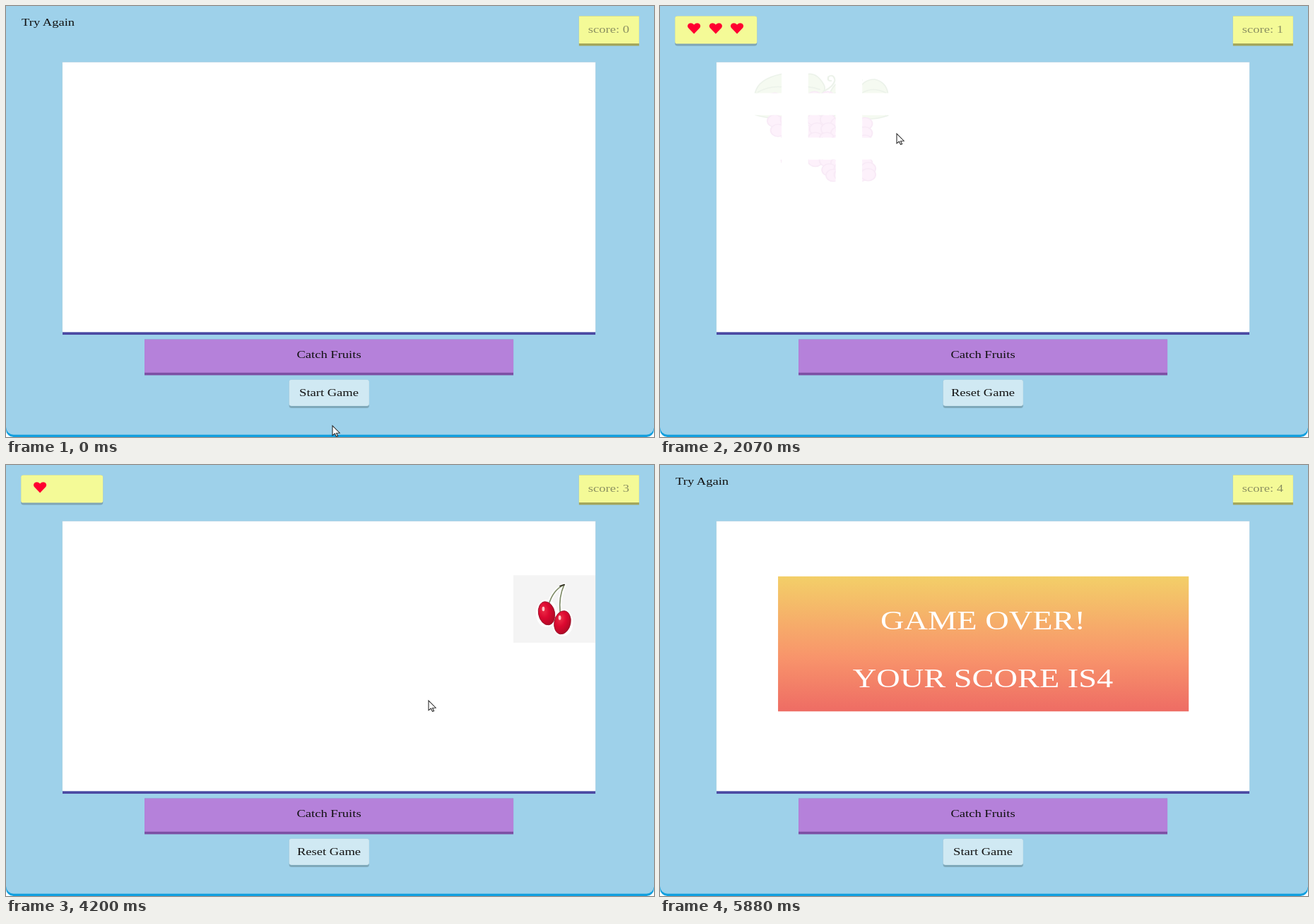
These frames come from a looping animation (917x611 px, 5910 ms). An HTML page:

```html
<!DOCTYPE html>
<html lang="en">
<head>
<meta charset="utf-8">
<title>Catch Fruits</title>
<style>
  html, body { margin: 0; width: 100%; height: 100%; overflow: hidden; background: #fff; }
  #stage { display: block; width: 917px; height: 611px; }
  text { font: 16px "Liberation Serif", "Times New Roman", serif; fill: #111; }
  .mid { text-anchor: middle; }
  #score { fill: #8b9062; }
  #over text { font-size: 40px; fill: #fff; }
</style>
</head>
<body>
<!-- The page is laid out at 790.5 x 638.5 and the whole of it is fitted to the stage. -->
<svg id="stage" viewBox="0 0 790.5 638.5" preserveAspectRatio="none">
  <defs>
    <linearGradient id="sunset" x1="0" y1="0" x2="0" y2="1">
      <stop offset="0" stop-color="#f3cf68"/>
      <stop offset=".6" stop-color="#f8946b"/>
      <stop offset="1" stop-color="#ee6c64"/>
    </linearGradient>
    <radialGradient id="red" cx=".35" cy=".35" r=".75">
      <stop offset="0" stop-color="#ec3048"/>
      <stop offset=".45" stop-color="#dc0830"/>
      <stop offset="1" stop-color="#a80a24"/>
    </radialGradient>
    <clipPath id="field"><rect width="650" height="400"/></clipPath>
    <path id="heart" fill="#ff0030" d="M0 8.3L-7-.6C-10-5.5-4-11 0-5.2C4-11 10-5.5 7-.6Z"/>

    <g id="cherries">
      <rect width="100" height="100" fill="#f4f4f4"/>
      <g fill="#fff" stroke="#fff" stroke-width="6">
        <ellipse cx="40.5" cy="56.4" rx="10" ry="17.4"/>
        <ellipse cx="59.8" cy="70" rx="10" ry="17.4"/>
      </g>
      <g fill="none" stroke-linecap="round">
        <path d="M62 14Q48 22 43 44M62 14Q55 32 57 55" stroke="#fff" stroke-width="5"/>
        <path d="M62 14Q48 22 43 44M62 14Q55 32 57 55" stroke="#7f8c68" stroke-width="1.5"/>
        <path d="M57 16L62 14" stroke="#3c3a2c" stroke-width="2"/>
      </g>
      <g fill="url(#red)" stroke="#94132a" stroke-width=".8">
        <ellipse cx="40.5" cy="56.4" rx="10" ry="17.4" transform="rotate(-8 40.5 56.4)"/>
        <ellipse cx="59.8" cy="70" rx="10" ry="17.4" transform="rotate(8 59.8 70)"/>
      </g>
      <g fill="#ffc4c8">
        <ellipse cx="36.5" cy="50" rx="1.6" ry="3.4"/>
        <ellipse cx="56.5" cy="63" rx="1.6" ry="3.4"/>
      </g>
    </g>

    <g id="grapes">
      <g fill="#a9d27c" stroke="#4b8d3c" stroke-width="1.6">
        <path d="M1 33Q5 12 33 5Q44 3 52 20Q58 33 40 38Q20 40 1 33Z"/>
        <path d="M58 38Q66 12 82 13Q96 17 98 34Q80 42 58 38Z"/>
        <path d="M4 32Q24 18 48 28M64 35Q78 22 96 33" fill="none"/>
        <path d="M53 30Q64 24 66 14Q64 4 58 9Q56 16 62 15" fill="none" stroke-width="2"/>
      </g>
      <g id="bunch" fill="#ee7fe2" stroke="#bd38b2" stroke-width="1.6"></g>
    </g>
  </defs>

  <rect width="790.5" height="638.5" fill="#fff"/>
  <rect y="-30" width="790.5" height="668.5" rx="9" ry="11" fill="#129fde"/>
  <rect y="-30" width="790.5" height="665" rx="9" ry="11" fill="#9ed1ea"/>

  <text id="again" x="19" y="29.5">Try Again</text>
  <g id="lives">
    <rect x="18.3" y="15" width="100" height="44" rx="3" fill="#7fa5b6"/>
    <rect x="18.3" y="15" width="100" height="41" rx="3" fill="#f4fa97"/>
    <use href="#heart" x="41.5" y="33"/>
    <use href="#heart" x="68" y="33"/>
    <use href="#heart" x="94" y="33"/>
  </g>

  <rect x="699" y="15" width="73.3" height="44" fill="#a3a55a"/>
  <rect x="699" y="15" width="73.3" height="40.5" fill="#f4fa97"/>
  <text id="score" x="710.2" y="40.2"></text>

  <rect x="68.5" y="82.8" width="651" height="400" fill="#b9d6e4"/>
  <rect x="69" y="483" width="650" height="4" fill="#4b49a2"/>
  <g transform="translate(69 83.3)" clip-path="url(#field)">
    <rect width="650" height="400" fill="#fff"/>
    <use id="fruit"/>
    <g id="pieces"></g>
    <g id="over">
      <rect x="75" y="81.7" width="501" height="200" fill="url(#sunset)"/>
      <text class="mid" x="325" y="160">GAME OVER!</text>
      <text class="mid" x="325" y="246.3">YOUR SCORE IS4</text>
    </g>
  </g>

  <rect x="169" y="494" width="450" height="53" fill="#7c50a4"/>
  <rect x="169" y="494" width="450" height="49.2" fill="#b581da"/>
  <text class="mid" x="394" y="521.7">Catch Fruits</text>

  <rect x="345.4" y="553.6" width="97.6" height="42" rx="3" fill="#7fa9ba"/>
  <rect x="345.4" y="553.6" width="97.6" height="38.8" rx="3" fill="#d0e9f3"/>
  <text class="mid" id="button" x="394" y="577.8"></text>

  <path id="cursor" d="M0 0V14.4L2.9 11.6L4.7 16.2L6.6 15.4L4.8 10.8H8.8Z" fill="#fff" stroke="#222" stroke-width=".9"/>
</svg>

<script>
const LOOP = 5910, FRAME = 30, START = 1560, END = 5040, BURST = 150;
const SX = 917 / 790.5, SY = 611 / 638.5;
const $ = id => document.getElementById(id);
const NS = 'http://www.w3.org/2000/svg';

function add(parent, tag, attrs) {
  const el = document.createElementNS(NS, tag);
  set(el, attrs);
  return parent.appendChild(el);
}
function set(el, attrs) {
  for (const k in attrs) el.setAttribute(k, attrs[k]);
}
const show = (el, on) => { el.style.display = on ? '' : 'none'; };
const mix = (a, b, p) => a + (b - a) * p;
const swing = p => 0.5 - Math.cos(Math.PI * p) / 2;

// kind, left, first and last moment, last top, caught
const falls = [
  ['grapes', 78.5, 1560, 1935, 45, true],
  ['cherries', 310, 2100, 2430, 130, true],
  ['grapes', 180, 2580, 2970, 400, false],
  ['cherries', 420, 2970, 3210, 230, true],
  ['grapes', 300, 3420, 3990, 400, false],
  ['cherries', 550, 3990, 4410, 210, true],
  ['grapes', 240, 4560, END, 400, false]
];

// time, x, y of the pointer in stage pixels
const path = [
  [0, 462, 595], [120, 466, 622], [1200, 470, 622], [1380, 459, 547],
  [1590, 458, 546], [1920, 258, 190], [2070, 335, 181], [2430, 470, 250],
  [2700, 540, 300], [3210, 620, 336], [3390, 622, 335], [3900, 600, 334],
  [4200, 598, 334], [4410, 724, 331], [4590, 735, 332], [5010, 655, 333],
  [5400, 651, 333], [5640, 640, 622], [LOOP, 640, 622]
];

const bunch = [[25, 42], [41, 40], [57, 40], [70, 46], [29, 56], [44, 54], [58, 54],
  [70, 60], [42, 68], [56, 68], [70, 72], [59, 82], [74, 80], [64, 90], [74, 89]];
for (const [cx, cy] of bunch) add($('bunch'), 'circle', { cx, cy, r: 9 });

const CELL = 100 / 3;
const pieces = [];
for (let i = 0; i < 9; i++) {
  const col = i % 3, row = Math.floor(i / 3);
  const box = add($('pieces'), 'svg', {
    width: CELL, height: CELL,
    viewBox: `${col * CELL} ${row * CELL} ${CELL} ${CELL}`
  });
  pieces.push({ box, col, row, image: add(box, 'use', {}) });
}

function drawFruit(t) {
  const fall = falls.find(f => t >= f[2] && t < f[3]);
  show($('fruit'), fall);
  if (fall) {
    const [kind, x, from, to, top] = fall;
    set($('fruit'), { href: '#' + kind, x, y: mix(-50, top, (t - from) / (to - from)) });
  }

  const hit = falls.find(f => f[5] && t >= f[3] && t < f[3] + BURST);
  show($('pieces'), hit);
  if (!hit) return;
  const [kind, x, , at, y] = hit;
  const p = (t - at) / BURST, spread = swing(p);
  set($('pieces'), { opacity: 1 - p });
  for (const { box, col, row, image } of pieces) {
    set(image, { href: '#' + kind });
    set(box, {
      x: x + CELL * (col + (col - 1) * spread),
      y: y + CELL * (row + (row - 1) * spread)
    });
  }
}

function drawCursor(t) {
  const i = path.findIndex(k => k[0] > t);
  const [t0, x0, y0] = path[i - 1], [t1, x1, y1] = path[i];
  const p = swing((t - t0) / (t1 - t0));
  set($('cursor'), { transform: `translate(${mix(x0, x1, p) / SX} ${mix(y0, y1, p) / SY})` });
}

function draw(t) {
  const playing = t >= START && t < END;
  const count = caught => falls.filter(f => f[5] === caught && t >= f[3]).length;
  show($('again'), !playing);
  show($('lives'), playing);
  show($('over'), t >= END);
  $('lives').querySelectorAll('use').forEach((h, i) => show(h, i < 3 - count(false)));
  $('score').textContent = 'score: ' + count(true);
  $('button').textContent = playing ? 'Reset Game' : 'Start Game';
  drawFruit(t);
  drawCursor(t);
}

function tick() {
  const t = performance.now() % LOOP;
  draw(Math.floor(t / FRAME) * FRAME);
  requestAnimationFrame(tick);
}
tick();
</script>
</body>
</html>
```
